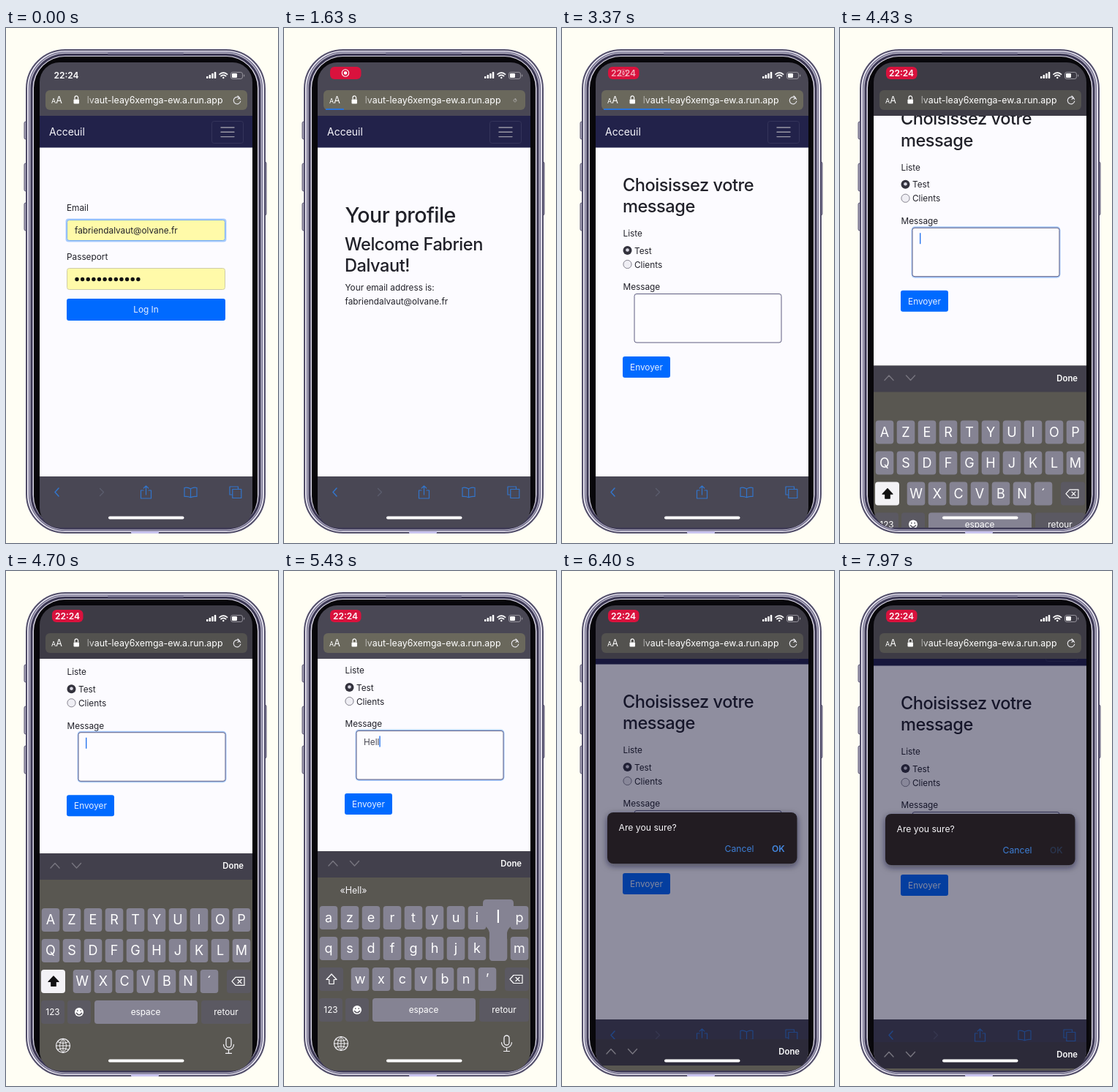
An HTML page for the animation above (8000 ms loop, 372 by 704 pixels).

```html
<!DOCTYPE html>
<html lang="fr">
<head>
<meta charset="utf-8">
<title>Message</title>
<style>
  html, body { margin: 0; width: 100%; height: 100%; overflow: hidden; background: #fffef4; }
  svg { display: block; width: 372px; height: 704px; font: 11.8px Inter, "Open Sans", sans-serif; }
  text { white-space: pre; }
  .title { font-weight: 500; font-size: 23.6px; letter-spacing: -.02em; }
  .key { font-size: 18px; text-anchor: middle; }
  .mid { text-anchor: middle; }
  .line { fill: none; stroke-linecap: round; stroke-linejoin: round; }
</style>
</head>
<body>
<svg viewBox="0 0 372 704" id="stage"></svg>
<script>
const LOOP = 8000;
const rect = (x, y, w, h, r, fill, extra = '') =>
  `<rect x="${x}" y="${y}" width="${w}" height="${h}" rx="${r}" fill="${fill}" ${extra}/>`;
const text = (x, y, s, fill = '#212129', extra = '') => `<text x="${x}" y="${y}" fill="${fill}" ${extra}>${s}</text>`;
const line = (d, color, w = 1.2, extra = '') => `<path class="line" d="${d}" stroke="${color}" stroke-width="${w}" ${extra}/>`;
const circle = (x, y, r, fill, extra = '') => `<circle cx="${x}" cy="${y}" r="${r}" fill="${fill}" ${extra}/>`;
const group = (id, content, extra = '') => `<g id="${id}" ${extra}>${content}</g>`;
const repeat = (n, f) => Array.from({ length: n }, (_, i) => f(i)).join('');

const phone = () =>
  [[128, 24], [185, 38], [239, 38]].map(([y, h]) => rect(25, y, 5, h, 2, '#aaa7bb', 'stroke="#55516f"')).join('') +
  rect(351, 183, 5, 73, 2, '#aaa7bb', 'stroke="#55516f"') +
  rect(28, 30, 326, 660, 53, '#efedf6', 'stroke="#514d69" stroke-width="2"') +
  rect(31.5, 33, 319, 654, 50, '#c5c2d3', 'stroke="#777390" stroke-width="1.5"') +
  rect(35, 36.5, 312, 647.5, 46, '#dedbe8', 'stroke="#3c3854" stroke-width="3"') +
  rect(38, 39, 306, 644, 43, '#08070b') +
  rect(139, 34, 104, 2, 1, '#777390') +
  rect(171, 688, 38, 3, 1, '#c9c4ee');

const loginPage = () =>
  text(83, 250, 'Email') +
  rect(81.5, 260.5, 220, 32, 4, '#a9ccff') +
  rect(83.5, 262.5, 216, 28, 3, '#fffaa9', 'stroke="#78aef5"') +
  text(94, 281, 'fabriendalvaut@olvane.fr') +
  text(83, 317, 'Passeport') +
  rect(83.5, 328.5, 216, 29, 3, '#fffaa9', 'stroke="#cfcca8"') +
  repeat(12, i => circle(97 + i * 7.62, 343.5, 2.7, '#111')) +
  rect(83, 370, 217, 30, 3, '#006aff', 'id="loginButton"') +
  text(191.5, 389.3, 'Log In', '#e8f0ff', 'class="mid"');

const profilePage = () =>
  text(83.5, 265.5, 'Your profile', '#212129', 'class="title" style="font-size:28.6px"') +
  text(83, 303.5, 'Welcome Fabrien', '#212129', 'class="title"') +
  text(83, 333, 'Dalvaut!', '#212129', 'class="title"') +
  text(83.5, 359.3, 'Your email address is:') +
  text(83.5, 378, 'fabriendalvaut@olvane.fr');

const messagePage = () =>
  text(83, 222.5, 'Choisissez votre', '#212129', 'class="title"') +
  text(83, 252, 'message', '#212129', 'class="title"') +
  text(83.5, 285, 'Liste') +
  circle(89.5, 304, 6, '#33323d') + circle(89.5, 303.5, 2.3, '#d8d7e2') + text(99, 308.5, 'Test') +
  circle(89.5, 323, 5.6, '#efeef4', 'stroke="#85838f"') + text(99, 327.5, 'Clients') +
  text(83.5, 358.3, 'Message') +
  rect(97.5, 361.5, 204, 70.5, 5, '#a9ccff', 'id="ring"') +
  rect(99, 363.5, 201, 66.5, 3, '#fdfcff', 'stroke="#5e5d80"') +
  text(109, 382.5, '', '#4a4954', 'id="typed"') +
  rect(0, 370.5, 1.4, 15, 0, '#2a76ee', 'id="caret"') +
  rect(83, 449, 65, 29, 3, '#006aff') +
  text(115.5, 468, 'Envoyer', '#e8f0ff', 'class="mid"');

const navbar = () =>
  rect(46, 120, 292, 43.5, 0, '#22224a') +
  text(59, 147, 'Acceuil', '#f5f4fa', 'font-size="14"') +
  rect(281.5, 127.5, 43, 30, 3, 'none', 'stroke="#34345a"') +
  line('M294 136h18M294 142.3h18M294 148.6h18', '#9998a5', 1.4);

const topBar = () =>
  rect(46, 46, 292, 74, 0, '#494754', 'id="barBack"') +
  rect(54, 85, 276, 27, 6, '#6a685c', 'id="urlBack"') +
  rect(63, 53, 42.5, 17, 6, '#d9123d', 'id="pill"') +
  text(84, 65.8, '22:24', '#fff', 'id="clock" class="mid" font-weight="600" font-size="12"') +
  group('record', circle(84, 61.5, 4.7, 'none', 'stroke="#fff" stroke-width="1.1"') + circle(84, 61.5, 2.3, '#fff')) +
  repeat(4, i => rect(274 + i * 3.6, 66 - i * 2, 2.5, 3 + i * 2, .7, '#fff')) +
  line('M292 63.3q5.3-4.4 10.6 0M294 65.7q3.3-2.5 6.6 0', '#fff', 1.7) + circle(297.3, 68, 1.2, '#fff') +
  rect(307.5, 60.5, 16, 9, 2.6, 'none', 'stroke="#96949d"') + rect(309, 62, 7, 6, 1.2, '#fff') +
  rect(325, 63.5, 1.2, 3, .6, '#96949d') +
  text(62, 103, '<tspan font-size="9">A</tspan>A', '#fff', 'font-size="12.5"') +
  rect(92.5, 97.5, 7.5, 6, 1, '#fff') + line('M94 97v-1.8a2.3 2.3 0 0 1 4.6 0v1.8', '#fff') +
  text(296.5, 103, 'lvaut-leay6xemga-ew.a.run.app', 'url(#urlFade)', 'text-anchor="end" font-size="12.4"') +
  group('reload', line('M4.6-1.5A4.8 4.8 0 1 0 4.8 1M1-6l2.4 2.2L1-1.6', '#e4e3e8')) +
  rect(57, 110.2, 0, 1.9, .9, '#2377ec', 'id="progress"');

const toolbar = () =>
  rect(46, 613, 292, 75, 0, '#494754') +
  line('M72 629l-5 5.5 5 5.5', '#3275cb', 1.5) +
  line('M128.500 629.500l5 5-5 5', '#5b5d6e') +
  line('M188 632h-3.500v11h14v-11h-3.500M191.500 638v-12M188.300 629l3.200-3.200 3.200 3.200', '#3275cb') +
  line('M252.500 630q-4-2.500-8.500-1.500v12q4.500-.8 8.500 1.300 4-2.100 8.500-1.300v-12q-4.500-1-8.500 1.500v11.500', '#3275cb') +
  line('M309.500 638h-3.500v-11h11.500v3M309.800 630.500h12v12h-12z', '#3275cb');

const ROWS = ['azertyuiop', 'qsdfghjklm', 'wxcvbn´'];
const keyPlace = letter => {
  const row = ROWS.findIndex(r => r.includes(letter));
  return { x: (row === 2 ? 104 : 61) + ROWS[row].indexOf(letter) * 29, y: 474 + row * 42 };
};

const keyboard = () => {
  const keys = [...ROWS.join('')].map(c => {
    const { x, y } = keyPlace(c);
    return rect(x - 12.3, y - 16, 24.6, 32, 4, '#858393') + text(x, y + 6, c, '#fff', 'class="key letter"');
  }).join('');
  const dark = '#5b5962';
  return rect(46, 383, 292, 310, 0, '#595751') +
    rect(46, 383, 292, 36, 0, '#42404c', 'id="accessory"') +
    line('M61 403l6-6.500 6 6.500M90.500 396.500l6 6.500 6-6.500', '#77757f', 1.4) +
    text(325, 404.3, 'Done', '#fff', 'text-anchor="end" font-weight="600" font-size="11.3"') +
    text(95, 441, '', '#f3f2f5', 'id="guess" class="mid" font-size="12.5"') +
    keys +
    rect(48, 542, 33, 32, 4, dark, 'id="shiftKey"') +
    line('M65 551l7 7.500h-3.800v6h-6.400v-6H58z', '#fff', 1.2, 'id="shiftArrow"') +
    rect(302, 542, 33, 32, 4, dark) +
    line('M309 558l5-5.500h12v11h-12zM317 555.500l5 5M322 555.500l-5 5', '#fff', 1.2) +
    rect(48, 584, 32, 32, 4, dark) + text(64, 604, '123', '#fff', 'class="mid"') +
    rect(84, 584, 32, 32, 4, dark) + circle(100, 600, 6, '#fff') +
    line('M96.500 601.500q3.500 4.500 7 0M97.800 598v.3M102.200 598v.3', dark, 1.6) +
    rect(121, 584, 141, 32, 4, '#858393') + text(191, 604, 'espace', '#fff', 'class="mid"') +
    rect(267, 584, 68, 32, 4, dark) + text(301, 604, 'retour', '#fff', 'class="mid"') +
    circle(78, 646, 9.500, 'none', 'stroke="#f2f1f5" stroke-width="1.200"') +
    line('M78 636.500v19M68.500 646h19M70.500 640.500q7.500 4 15 0M70.500 651.500q7.500-4 15 0M78 636.500c-6 5-6 14 0 19c6-5 6-14 0-19', '#f2f1f5', 1) +
    rect(301, 635, 7, 13, 3.5, 'none', 'stroke="#f2f1f5" stroke-width="1.300"') +
    line('M297.500 644.500a7 7 0 0 0 14 0M304.500 652v4M300.500 656.500h8', '#f2f1f5') +
    group('popup', `<path d="M-16-25h32q5 0 5 5v24q0 5-5 9q-4 4-4 9v32q0 5-4 5h-16q-4 0-4-5v-32q0-5-4-9q-5-4-5-9v-24q0-5 5-5z" fill="#858393"/>` +
      text(0, 7, '', '#fff', 'id="popLetter" class="mid" font-size="24"'));
};

const alertBox = () =>
  rect(62, 330, 259.5, 70, 8, '#211f22', 'filter="url(#shadow)"') +
  text(77.5, 354.5, 'Are you sure?', '#f6f5f8', 'font-size="12.2"') +
  text(222.5, 384.3, 'Cancel', '#3d7fd6', 'font-size="12.2"') +
  text(287, 384.3, 'OK', '#4388e0', 'id="ok" font-weight="600" font-size="12"');

document.getElementById('stage').innerHTML = `
<defs>
  <clipPath id="screen">${rect(46, 47, 291, 636, 27, '#000')}</clipPath>
  <clipPath id="view">${rect(46, 120, 291, 493, 0, '#000')}</clipPath>
  <linearGradient id="urlFade" gradientUnits="userSpaceOnUse" x1="105" x2="122">
    <stop stop-color="#fff" stop-opacity=".15"/><stop offset="1" stop-color="#fff"/>
  </linearGradient>
  <filter id="shadow" x="-20%" y="-40%" width="140%" height="180%">
    <feDropShadow dx="0" dy="3" stdDeviation="5" flood-color="#15142a" flood-opacity=".6"/>
  </filter>
</defs>
${phone()}
<g clip-path="url(#screen)">
  <g clip-path="url(#view)">
    ${rect(46, 120, 292, 494, 0, '#fcfbff')}
    ${group('page', group('login', loginPage()) + group('profile', profilePage()) + group('message', messagePage()) + navbar())}
  </g>
  ${toolbar()}
  ${rect(46, 120, 292, 566, 0, '#0b0a2a', 'id="dim"')}
  ${topBar()}
  ${group('keyboard', keyboard())}
  ${group('alert', alertBox())}
  ${rect(140, 667.5, 103.500, 4, 2, '#fff')}
</g>`;

const el = {};
document.querySelectorAll('[id]').forEach(n => el[n.id] = n);
const letters = [...document.querySelectorAll('.letter')];
const set = (id, attrs) => Object.entries(attrs).forEach(([k, v]) => el[id].setAttribute(k, v));
const show = (id, on) => set(id, { opacity: +on });

// Steps are [time, value] pairs, joined by straight runs.
const track = (steps, t) => {
  const i = steps.findIndex(s => s[0] > t);
  if (i < 0) return steps[steps.length - 1][1];
  if (i === 0) return steps[0][1];
  const [[t0, a], [t1, b]] = [steps[i - 1], steps[i]];
  return a + (b - a) * (t - t0) / (t1 - t0);
};

const SCROLL = [[4180, 0], [4300, 50], [4430, 90], [4560, 126], [4720, 145], [6130, 145], [6260, 80], [6400, 36], [6520, 34]];
const KEYBOARD = [[4180, 310], [4300, 180], [4430, 79], [4560, 25], [4720, 0], [6130, 0], [6260, 160], [6400, 257], [6520, 261]];
const PROGRESS = [[500, 0], [650, 28], [1100, 274], [1200, 274], [1201, 0], [1550, 0], [1630, 25], [3370, 91], [3650, 274], [3750, 274], [3751, 0]];
const PILL = [[500, 0], [600, 1]];
const CLOCK = [[500, 1], [600, 0], [3240, 0], [3440, 1]];
const DIM = [[6150, 0], [6350, .45]];
const ALERT = [[6200, 0], [6330, 1]];
const RELOAD = [[1540, 1], [1630, .4], [1720, 1]];
const OK = [[7780, 1], [7900, .22]];
const TYPING = [[4850, 'h'], [5030, 'e'], [5210, 'l'], [5390, 'l'], [5600, 'o']];

function draw(t) {
  const scroll = track(SCROLL, t), lift = track(KEYBOARD, t);
  const asking = t >= 6200, moving = t > 4180 && t < 4720;
  const focused = t >= 4180 && t < 6130;

  show('login', t < 1150);
  show('profile', t >= 1150 && t < 2500);
  show('message', t >= 2500);
  set('page', { transform: `translate(0 ${-scroll})` });
  set('loginButton', { fill: t > 350 && t < 600 ? '#0059d8' : '#006aff' });

  const pill = track(PILL, t), clock = track(CLOCK, t);
  show('pill', pill);
  show('clock', clock);
  show('record', Math.min(pill, 1 - clock));
  set('clock', { y: t < 500 ? 69.2 : 65.8, x: t < 500 ? 82.5 : 84 });
  set('progress', { width: track(PROGRESS, t) });
  set('reload', { transform: `translate(316 99) scale(${track(RELOAD, t)})` });
  set('barBack', { fill: asking || moving ? '#3d3b45' : '#494754' });
  set('urlBack', { fill: asking || moving ? '#53524f' : '#6a685c' });

  const done = TYPING.filter(s => s[0] <= t);
  const word = done.map(s => s[1]).join('').replace(/^h/, 'H');
  el.typed.textContent = word;
  show('ring', focused);
  show('caret', focused);
  set('caret', { x: 109 + (word ? el.typed.getComputedTextLength() : 0) });
  el.guess.textContent = word && `«${word}»`;

  const upper = !word;
  letters.forEach((n, i) => {
    const c = ROWS.join('')[i];
    n.textContent = upper ? c.toUpperCase() : c === '´' ? '’' : c;
  });
  set('shiftKey', { fill: upper ? '#f3f2f5' : '#5b5962' });
  set('shiftArrow', { stroke: upper ? '#111' : '#fff', fill: upper ? '#111' : 'none', style: `fill:${upper ? '#111' : 'none'}` });
  set('keyboard', { transform: `translate(0 ${lift})` });
  set('accessory', { fill: asking ? '#2c2a39' : '#42404c' });

  const last = done[done.length - 1];
  const pressed = last && t - last[0] < 110;
  show('popup', pressed);
  if (pressed) {
    const { x, y } = keyPlace(last[1]);
    set('popup', { transform: `translate(${x} ${y - 42})` });
    el.popLetter.textContent = done.length === 1 ? 'H' : last[1];
  }

  set('dim', { opacity: track(DIM, t) });
  show('alert', track(ALERT, t));
  set('alert', { transform: `translate(0 ${asking ? Math.max(0, 36 - scroll) : 0})` });
  show('ok', track(OK, t));
}

const start = performance.now();
function tick() {
  draw((performance.now() - start) % LOOP);
  requestAnimationFrame(tick);
}
tick();
</script>
</body>
</html>
```
